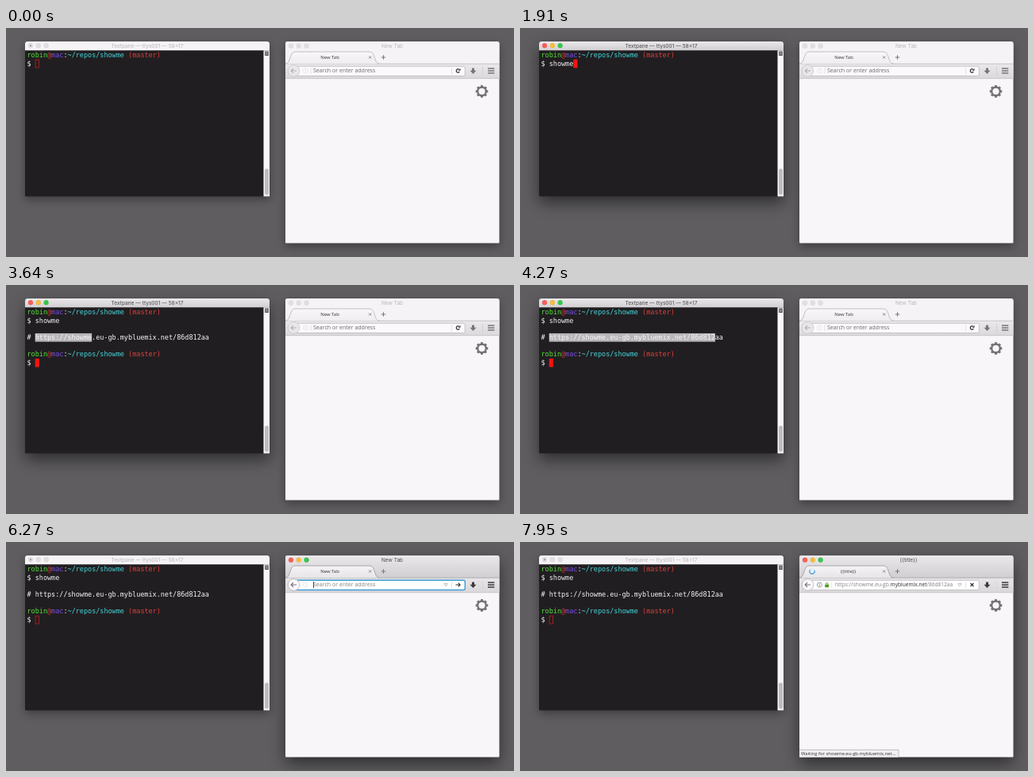
Write an HTML page with a canvas that moves like this. It is 640 px wide and 289 px high and loops after 8 s.

```html
<!DOCTYPE html>
<html lang="en">
<head>
<meta charset="utf-8">
<title>showme</title>
<style>
html, body { margin: 0; width: 100%; height: 100%; overflow: hidden; background: #5f5d60; }
canvas { display: block; width: 640px; height: 289px; }
</style>
</head>
<body>
<canvas id="stage"></canvas>
<script>
const W = 640, H = 289, LOOP = 8000;
const canvas = document.getElementById('stage');
const ctx = canvas.getContext('2d');
const ratio = window.devicePixelRatio || 1;
canvas.width = W * ratio;
canvas.height = H * ratio;

const UI = 'Inter, sans-serif';
const CHROME = '"Open Sans", sans-serif';
const MONO = '8.48px "DejaVu Sans Mono", monospace';
const COL = 5.104, ROW = 10.65, LEFT = 26.5, TOP = 29;

const CMD = 'showme';
const HOST = 'showme.eu-gb.mybluemix.net';
const URL_PARTS = ['https://showme.eu-gb.', 'mybluemix.net', '/86d812aa'];
const ADDRESS = URL_PARTS.join('');
const PROMPT = [
  ['robin', '#55e03a'], ['@', '#e03a34'], ['mac', '#7a4fe8'],
  [':', '#e4e2e4'], ['~/repos/showme', '#45d4d8'], [' (master)', '#dd403c']
];

// Moments of the story, in ms.
const AT = {
  shellFocus: 420, type: 1000, key: 150, enter: 2300, output: 2600,
  select: 3450, selectTime: 1000, deselect: 5400,
  webFocus: 5900, barFocus: 6100, paste: 6950, go: 7420, loading: 7680
};

function vertical(y1, y2, from, to) {
  const g = ctx.createLinearGradient(0, y1, 0, y2);
  g.addColorStop(0, from);
  g.addColorStop(1, to);
  return g;
}

function rect(x, y, w, h, fill) {
  ctx.fillStyle = fill;
  ctx.fillRect(x, y, w, h);
}

function roundPath(x, y, w, h, r) {
  ctx.beginPath();
  ctx.roundRect(x, y, w, h, r);
}

function circle(x, y, r, fill, stroke, width = 0.7) {
  ctx.beginPath();
  ctx.arc(x, y, r, 0, Math.PI * 2);
  if (fill) { ctx.fillStyle = fill; ctx.fill(); }
  if (stroke) { ctx.strokeStyle = stroke; ctx.lineWidth = width; ctx.stroke(); }
}

// Each stroke is a flat list of x, y pairs.
function lines(color, width, ...strokes) {
  ctx.strokeStyle = color;
  ctx.lineWidth = width;
  ctx.beginPath();
  for (const s of strokes) {
    ctx.moveTo(s[0], s[1]);
    for (let i = 2; i < s.length; i += 2) ctx.lineTo(s[i], s[i + 1]);
  }
  ctx.stroke();
}

function label(text, x, y, size, color, family = CHROME, align = 'left') {
  ctx.font = `${size}px ${family}`;
  ctx.textAlign = align;
  ctx.fillStyle = color;
  ctx.fillText(text, x, y);
  return ctx.measureText(text).width;
}

function mono(text, col, row, color) {
  ctx.font = MONO;
  ctx.textAlign = 'left';
  ctx.fillStyle = color;
  ctx.fillText(text, LEFT + col * COL, TOP + row * ROW + 8.2);
}

function windowShape(x, y, w, h, focused, fill) {
  ctx.save();
  ctx.shadowColor = focused ? 'rgba(0,0,0,.52)' : 'rgba(0,0,0,.36)';
  ctx.shadowBlur = (focused ? 20 : 12) * ratio;
  ctx.shadowOffsetY = (focused ? 8 : 4) * ratio;
  roundPath(x, y, w, h, [3, 3, 1, 1]);
  ctx.fillStyle = fill;
  ctx.fill();
  ctx.restore();
}

function titleBar(x, y, w, h, focused) {
  roundPath(x, y, w, h, [3, 3, 0, 0]);
  ctx.fillStyle = focused ? vertical(y, y + h, '#ebe8eb', '#d1ced1') : '#f6f3f6';
  ctx.fill();
}

function lights(x, y, focused) {
  const fills = ['#fb5d57', '#fbbd3b', '#35c94b'];
  const edges = ['#e04a44', '#dfa228', '#26ac36'];
  fills.forEach((fill, i) => circle(x + i * 9.8, y, 2.9,
    focused ? fill : '#e2dfe2', focused ? edges[i] : '#cfcccf', 0.4));
}

function prompt(row) {
  let col = 0;
  for (const [text, color] of PROMPT) {
    mono(text, col, row, color);
    col += text.length;
  }
  mono('$', 0, row + 1, '#f4f2f4');
}

function cursor(col, row, focused) {
  const x = LEFT + col * COL, y = TOP + row * ROW;
  if (focused) return rect(x, y, COL, ROW, '#f5150f');
  ctx.strokeStyle = '#c21d1b';
  ctx.lineWidth = 0.8;
  ctx.strokeRect(x + 0.4, y + 0.4, COL - 0.8, ROW - 0.8);
}

function selectedCount(t) {
  if (t < AT.select || t >= AT.deselect) return 0;
  const p = Math.min(1, (t - AT.select) / AT.selectTime);
  return Math.floor(ADDRESS.length * (1 - (1 - p) ** 2));
}

function shell(t) {
  const focused = t >= AT.shellFocus && t < AT.webFocus;
  windowShape(24, 17, 308, 195.5, focused, '#211e21');
  titleBar(24, 17, 308, 11.3, focused);
  lights(31, 22.2, focused);
  if (!focused) circle(31, 22.2, 1, '#8f8c8f');
  label('Textpane — ttys001 — 58×17', 178, 25, 6.6, focused ? '#4b484b' : '#b9b5b9', UI, 'center');

  rect(324.5, 28.3, 7.5, 184.2, '#f8f6f8');
  rect(326.2, 29.5, 4.6, 5.5, '#555255');
  lines('#f0eef0', 0.6, [327, 31.3, 330, 31.3], [327, 33.2, 330, 33.2]);
  roundPath(326, 177.5, 5, 33, 2.5);
  ctx.fillStyle = '#bfbcbf';
  ctx.fill();

  const done = t >= AT.output;
  const typed = Math.max(0, Math.min(CMD.length, Math.floor((t - AT.type) / AT.key) + 1));
  prompt(0);
  mono(CMD.slice(0, typed), 2, 1, '#f4f2f4');
  if (done) {
    const n = selectedCount(t);
    if (n) rect(LEFT + 2 * COL, TOP + 3 * ROW, n * COL, ROW, '#b9b6b9');
    mono('# ' + ADDRESS, 0, 3, '#f8f6f8');
    prompt(5);
    cursor(2, 6, focused);
  } else if (t >= AT.enter) {
    cursor(0, 2, focused);
  } else {
    cursor(2 + typed, 1, focused);
  }
}

function tab(focused) {
  ctx.beginPath();
  ctx.moveTo(352, 45.2);
  ctx.bezierCurveTo(359, 45, 357, 30, 364, 30);
  ctx.lineTo(458, 30);
  ctx.bezierCurveTo(466, 30, 463, 45, 470.5, 45.2);
  ctx.fillStyle = focused ? vertical(30, 45, '#f5f3f5', '#e7e5e7') : vertical(30, 45, '#f9f7f9', '#efedef');
  ctx.fill();
  ctx.strokeStyle = focused ? '#8f8c8f' : '#aaa7aa';
  ctx.lineWidth = 0.7;
  ctx.stroke();
}

function gear(x, y) {
  circle(x, y, 5.3, null, '#747176', 2.4);
  ctx.save();
  ctx.translate(x, y);
  for (let i = 0; i < 8; i++) {
    rect(-1.5, -7.8, 3, 2, '#747176');
    ctx.rotate(Math.PI / 4);
  }
  ctx.restore();
}

function goIcon(x, y, kind, ink) {
  if (kind === 'stop') {
    lines(ink, 1.1, [x - 2, y - 2, x + 2, y + 2], [x + 2, y - 2, x - 2, y + 2]);
  } else if (kind === 'go') {
    lines(ink, 1.1, [x - 3, y, x + 2.6, y], [x + 0.3, y - 2.4, x + 2.7, y, x + 0.3, y + 2.4]);
  } else {
    ctx.beginPath();
    ctx.arc(x, y, 2.2, 0.5, 5.4);
    ctx.strokeStyle = ink;
    ctx.lineWidth = 1.2;
    ctx.stroke();
    ctx.beginPath();
    ctx.moveTo(x + 3, y - 3);
    ctx.lineTo(x + 3, y - 0.2);
    ctx.lineTo(x + 0.2, y - 0.2);
    ctx.fillStyle = ink;
    ctx.fill();
  }
}

function infoIcon(x, y, color) {
  circle(x, y, 3, null, color, 0.7);
  rect(x - 0.4, y - 0.6, 0.8, 2.3, color);
  rect(x - 0.4, y - 1.9, 0.8, 0.8, color);
}

function lock(x, y) {
  rect(x - 2.4, y - 0.5, 4.8, 3.7, '#4f9d1f');
  ctx.beginPath();
  ctx.arc(x, y - 0.8, 1.6, Math.PI, 0);
  ctx.strokeStyle = '#4f9d1f';
  ctx.lineWidth = 0.9;
  ctx.stroke();
}

function addressBar(t, focused) {
  const editing = t >= AT.barFocus && t < AT.go;
  const pasted = t >= AT.paste, going = t >= AT.go;
  const ink = focused ? '#3b393b' : '#777477';

  roundPath(365, 48.3, 213.3, 12.2, 2);
  ctx.fillStyle = focused ? '#ffffff' : '#fbf9fb';
  ctx.fill();
  ctx.strokeStyle = editing ? '#3f9bd8' : '#b3b0b3';
  ctx.lineWidth = editing ? 1.4 : 0.7;
  ctx.stroke();
  circle(362.5, 54, 7.3, focused ? '#faf8fa' : '#e9e7e9', focused ? '#aaa7aa' : '#c3c0c3');
  const arrow = focused ? '#777477' : '#b4b1b4';
  lines(arrow, 1.2, [359.2, 54, 366, 54], [362, 51.2, 359.2, 54, 362, 56.8]);

  infoIcon(377.3, 54, going ? '#777477' : '#e3e0e3');
  if (going) {
    lock(386.6, 54);
    lines('#d5d2d5', 0.6, [392.7, 50.5, 392.7, 58]);
    let x = 397;
    URL_PARTS.forEach((part, i) => {
      x += label(part, x, 56.4, 6.6, i === 1 ? '#2b292b' : '#858285');
    });
  } else {
    if (!editing) lines('#d5d2d5', 0.6, [384, 50.5, 384, 58]);
    let caret = 387.5;
    if (pasted) caret += label(ADDRESS, 387, 56.4, 6.6, '#2b292b');
    else label('Search or enter address', 387, 56.4, 7.05, editing ? '#858285' : '#6b686b');
    if (editing) rect(caret - 0.4, 50.2, 0.8, 8, '#1e1c1e');
  }

  if (editing || going) {
    lines('#a9a6a0', 0.7, [551.8, 52.6, 556.4, 52.6, 554.1, 56, 551.8, 52.6]);
  }
  lines('#d0cdd0', 0.6, [561.5, 50.3, 561.5, 58.3]);
  goIcon(569.5, 54, going ? 'stop' : editing ? 'go' : 'reload', '#2f2d2f');

  ctx.fillStyle = ink;
  ctx.fillRect(587, 50.6, 3, 3.6);
  ctx.beginPath();
  ctx.moveTo(584.5, 53.8);
  ctx.lineTo(592.5, 53.8);
  ctx.lineTo(588.5, 58);
  ctx.fill();
  lines(focused ? '#d0cdd0' : '#c9c6c9', 0.6, [600.5, 48.5, 600.5, 60]);
  for (let i = 0; i < 3; i++) rect(607, 50.4 + i * 2.9, 8.3, 1.5, ink);
}

function spinner(t) {
  const a = t / 1000 * Math.PI * 2;
  circle(368, 37, 3.2, null, '#dce8f3', 1.3);
  ctx.beginPath();
  ctx.arc(368, 37, 3.2, a, a + 4.1);
  ctx.strokeStyle = '#4d9ce0';
  ctx.lineWidth = 1.3;
  ctx.stroke();
}

function browser(t) {
  const focused = t >= AT.webFocus;
  const going = t >= AT.go, loading = t >= AT.loading;
  windowShape(352, 17, 269.5, 254.5, focused, '#f8f6f9');
  titleBar(352, 17, 269.5, 28.5, focused);
  lights(359, 22.7, focused);
  label(loading ? '{{title}}' : 'New Tab', loading ? 489.5 : 486.5, 25.4, 6.5,
    focused ? '#4b484b' : '#b9b5b9', UI, 'center');

  rect(352, 45, 269.5, 18.7, focused ? vertical(45, 64, '#e8e6e8', '#d9d7d9') : vertical(45, 64, '#ebe9eb', '#dad8da'));
  lines(focused ? '#9a979a' : '#b5b2b5', 0.7, [352, 45.2, 621.5, 45.2]);
  lines('#bab7ba', 0.7, [352, 63.7, 621.5, 63.7]);
  tab(focused);
  const name = loading ? '{{title}}' : going ? 'Connecting…' : 'New Tab';
  label(name, going ? 413.5 : 408, 39.1, 5.95, '#353335', CHROME, 'center');
  if (going) spinner(t);
  lines('#888588', 0.9, [457, 35.3, 460.4, 38.7], [460.4, 35.3, 457, 38.7]);
  lines('#777477', 1, [472.8, 37, 478.2, 37], [475.5, 34.3, 475.5, 39.7]);

  addressBar(t, focused);
  gear(599.5, 80);

  if (going) {
    rect(352, 262.3, 125, 9.2, '#f0eef0');
    lines('#aaa7aa', 0.7, [352, 262.3, 477, 262.3, 477, 271.5]);
    label(`Waiting for ${HOST}…`, 354, 269.3, 5.9, '#353335');
  }
}

function draw(t) {
  ctx.setTransform(ratio, 0, 0, ratio, 0, 0);
  rect(0, 0, W, H, '#5f5d60');
  shell(t);
  browser(t);
}

const start = performance.now();
function tick() {
  draw((performance.now() - start) % LOOP);
  requestAnimationFrame(tick);
}
tick();
</script>
</body>
</html>
```
